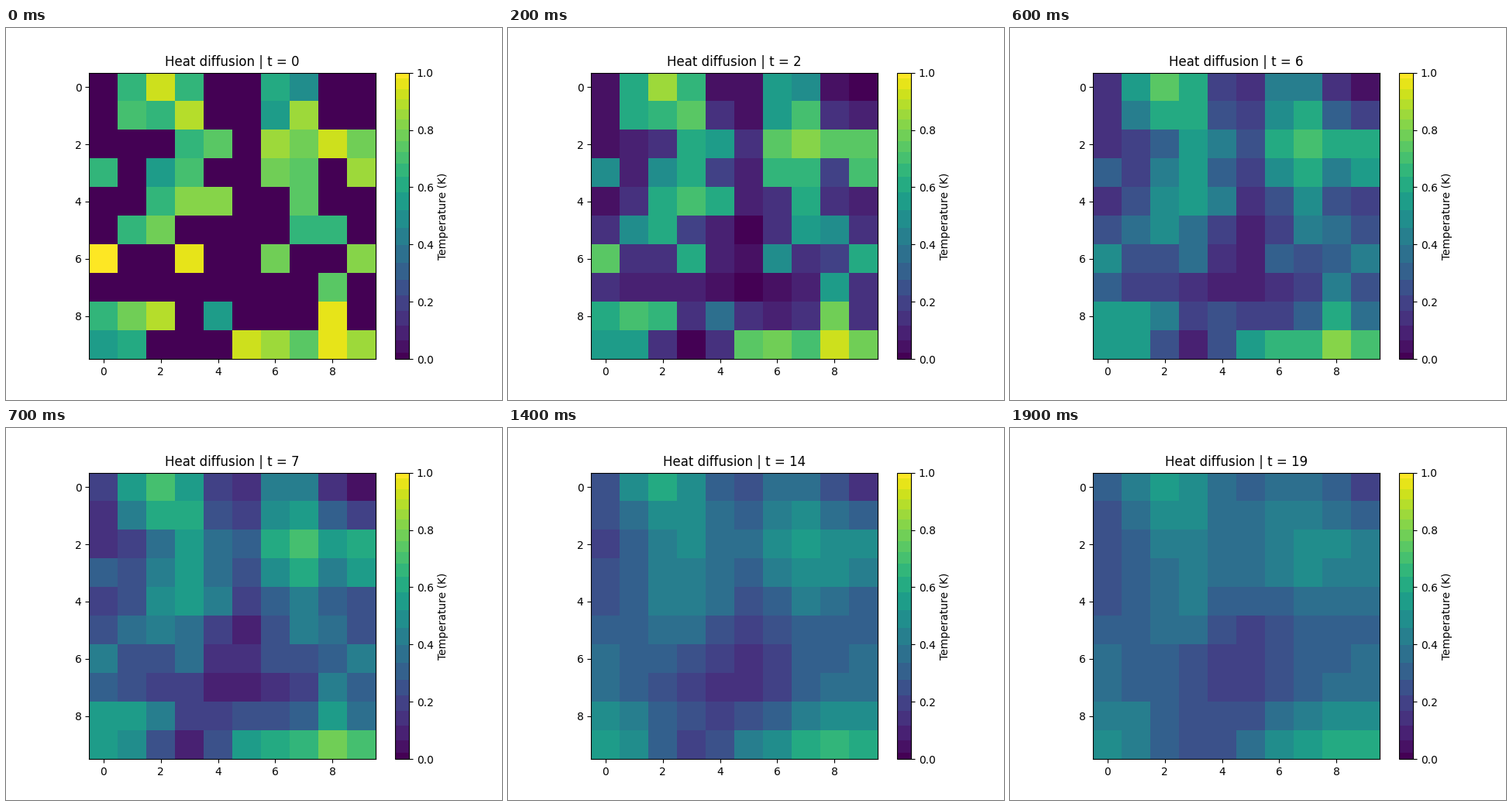
Write a matplotlib script that moves like this. It is 640 px wide and 480 px high and loops after 2 s.

```python
import matplotlib.pyplot as plt
import numpy as np
from matplotlib.animation import FuncAnimation
from matplotlib.colors import ListedColormap

SIZE = 10
STEPS = 20
ALPHA = 0.05
BANDS = 22

# Hot streaks of each row: first column -> temperatures; the rest is cold
STREAKS = [
    {1: [.66, .94, .66], 6: [.60, .49]},
    {1: [.72, .66, .88], 6: [.53, .85]},
    {3: [.66, .73], 6: [.87, .80, .93, .80]},
    {0: [.64], 2: [.53, .69], 6: [.80, .74], 9: [.85]},
    {2: [.66, .81, .83], 7: [.73]},
    {1: [.66, .77], 7: [.67, .67]},
    {0: [1], 3: [.97], 6: [.77], 9: [.83]},
    {8: [.73]},
    {0: [.66, .80, .88], 4: [.53], 8: [.97]},
    {0: [.54, .63], 5: [.93, .87, .76, .97, .85]},
]


def start_field():
    field = np.zeros((SIZE, SIZE))
    for row, streaks in zip(field, STREAKS):
        for col, temps in streaks.items():
            row[col:col + len(temps)] = temps
    return field


def banded_viridis():
    """Viridis in flat bands, narrower where the colour changes faster."""
    rgba = plt.get_cmap("viridis")(np.arange(256))
    speed = np.sqrt(np.linalg.norm(np.diff(rgba, axis=0), axis=1))
    path = np.concatenate([[0], np.cumsum(speed)]) / speed.sum()
    snapped = np.round(path * (BANDS - 1)) / (BANDS - 1)
    index = np.interp(snapped, path, np.arange(256)).round().astype(int)
    return ListedColormap(rgba[index])


def diffuse(temp):
    """One explicit step with insulated borders."""
    p = np.pad(temp, 1, mode="edge")
    around = p[:-2, 1:-1] + p[2:, 1:-1] + p[1:-1, :-2] + p[1:-1, 2:]
    return temp + ALPHA * (around - 4 * temp)


states = [start_field()]
for _ in range(STEPS - 1):
    states.append(diffuse(states[-1]))

fig, ax = plt.subplots(figsize=(6.4, 4.8), dpi=100)
image = ax.imshow(states[0], cmap=banded_viridis(), vmin=0, vmax=1)
fig.colorbar(image, ax=ax, label="Temperature (K)")
title = ax.set_title("Heat diffusion | t = 0")


def update(t):
    image.set_data(states[t])
    title.set_text(f"Heat diffusion | t = {t}")
    return image, title


anim = FuncAnimation(fig, update, frames=STEPS, interval=100, repeat=True,
                     repeat_delay=0)
plt.show()
```
